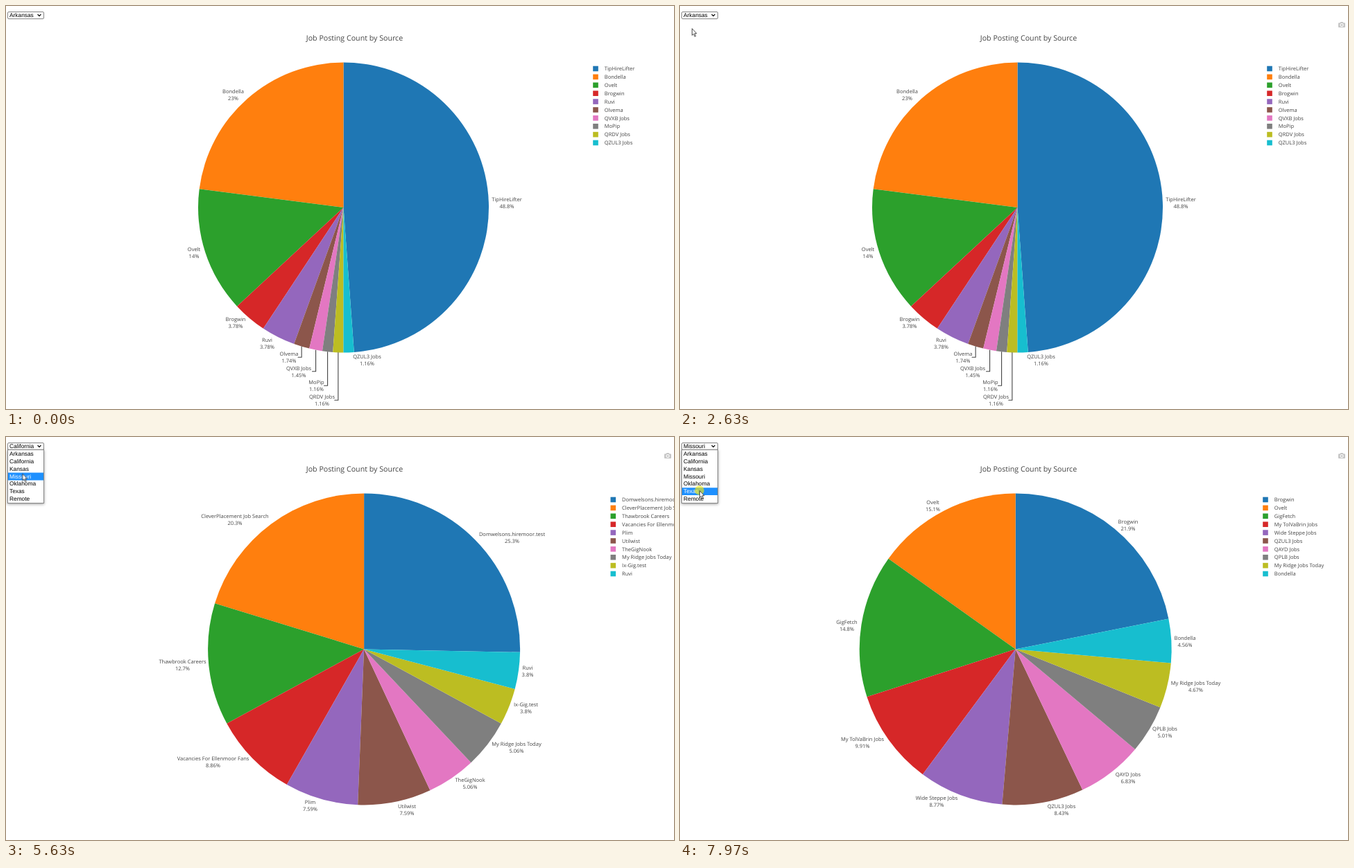
Animation of 963x582 px, one loop 8 s. Source, as an HTML page:

```html
<!DOCTYPE html>
<html lang="en">
<head>
<meta charset="utf-8">
<title>Job Posting Count by Source</title>
<style>
@property --row { syntax: "<number>"; inherits: true; initial-value: 0; }
html, body { margin: 0; width: 100%; height: 100%; overflow: hidden; background: #fff; }
#stage { position: relative; width: 963px; height: 582px; overflow: hidden; text-rendering: geometricPrecision; }
svg { position: absolute; left: 0; top: 0; }
svg text { font: 7.52px "Open Sans", sans-serif; fill: #444; }
svg .title { font-size: 10.66px; }
.mid { text-anchor: middle; }
.leader { fill: none; stroke: #444; stroke-width: 1.1; }

/* 1% of the loop is 80 ms */
.hard { animation: 8s step-end infinite; }
.a { animation-name: showA; }
.b { animation-name: showB; }
.c { animation-name: showC; }
@keyframes showA { 0% { opacity: 1; } 33.625%, 100% { opacity: 0; } }
@keyframes showB { 0% { opacity: 0; } 33.625% { opacity: 1; } 73.625%, 100% { opacity: 0; } }
@keyframes showC { 0% { opacity: 0; } 73.625%, 100% { opacity: 1; } }

.select, .frame, .list, .list ul { position: absolute; box-sizing: border-box; }
.select, .list { font: 8.36px/10.85px "Liberation Sans", Arial, sans-serif; color: #000; }
.select { left: 2px; top: 8px; width: 53px; height: 11px; border: 1px solid #858585; border-radius: 2px; }
.select span { position: absolute; left: 2px; top: -1px; }
.select svg { left: 41px; top: 1px; }
.focus { position: absolute; inset: -2px -1px -1px; border: 2px solid #101010; border-radius: 2px; animation-name: focus; }
@keyframes focus {
  0% { opacity: 0; } 33.625% { opacity: 1; } 62.875% { opacity: 0; }
  73.625% { opacity: 1; } 87.125%, 100% { opacity: 0; }
}
.frame, .list { left: 2px; top: 18px; width: 53px; height: 78px; background: #fff; }
.frame { box-shadow: 0 1px 4px rgba(0, 0, 0, .4); animation-name: frame; }
.list { border: 1px solid #858585; animation-name: list; }
@keyframes frame {
  0% { opacity: 0; } 22.625% { opacity: 1; } 32.85% { opacity: 0; } 62.875% { opacity: 1; }
  72.875% { opacity: 0; } 87.95%, 100% { opacity: 1; }
}
@keyframes list {
  0% { opacity: 0; } 23.5% { opacity: 1; } 32.85% { opacity: 0; } 63.75% { opacity: 1; }
  72.875% { opacity: 0; } 88.875%, 100% { opacity: 1; }
}
.list ul { inset: 0; margin: 0; padding: 0 0 0 2px; list-style: none; height: 75.95px; }
.list .picked {
  color: #fff; background: #1e90ff; animation-name: pick;
  clip-path: inset(calc(var(--row) * 10.85px) 0 calc((6 - var(--row)) * 10.85px) 0);
}
@keyframes pick {
  0% { --row: 0; } 26.9% { --row: 1; } 66.2% { --row: 2; } 67.3% { --row: 3; }
  90.5% { --row: 0; } 91.2% { --row: 1; } 92% { --row: 2; } 92.8% { --row: 3; }
  93.8% { --row: 4; } 95.6%, 100% { --row: 5; }
}

.camera { fill: #444; animation: camera 8s linear infinite; }
@keyframes camera {
  0%, 2.125% { opacity: 0; }
  5.5%, 17.5% { opacity: .3; }
  21%, 24.25% { opacity: .1; }
  27.7%, 37% { opacity: .3; }
  39.6%, 64.4% { opacity: .1; }
  67.8%, 84.5% { opacity: .3; }
  87.125%, 90% { opacity: .1; }
  93.7%, 100% { opacity: .3; }
}
.cursor { animation: move 8s ease-in-out infinite, enter 8s step-end infinite; }
@keyframes enter { 0% { opacity: 0; } 2.125%, 100% { opacity: 1; } }
@keyframes move {
  0%, 2.125% { transform: translate(330px, 538px); }
  11.625%, 12.375% { transform: translate(115.5px, 122px); }
  20%, 24.25% { transform: translate(28px, 15px); }
  27.7%, 37% { transform: translate(17px, 32px); }
  39.6%, 63.75% { transform: translate(27px, 12px); }
  67.8%, 84.5% { transform: translate(23.5px, 52.5px); }
  87%, 88.875% { transform: translate(27.5px, 14px); }
  93.875%, 94.75% { transform: translate(28px, 66px); }
  97.5%, 100% { transform: translate(28px, 77px); }
}
.click { fill: #ffec00; fill-opacity: .6; animation-name: click; }
@keyframes click {
  0% { opacity: 0; }
  21% { opacity: 1; } 22.625% { opacity: 0; }
  31.125% { opacity: 1; } 32.85% { opacity: 0; }
  62% { opacity: 1; } 63.75% { opacity: 0; }
  71.25% { opacity: 1; } 72.875% { opacity: 0; }
  87.125% { opacity: 1; } 88.875% { opacity: 0; }
  99.6%, 100% { opacity: 1; }
}
</style>
</head>
<body>
<div id="stage">
  <svg id="plot" width="963" height="582">
    <text class="title mid" x="502.5" y="50">Job Posting Count by Source</text>
    <path class="camera" fill-rule="evenodd" d="M950 24.3h1.6l.7-1.3h3.4l.7 1.3h1.6q1 0 1 1v4.8q0 1-1 1h-8q-1 0-1-1v-4.8q0-1 1-1z
      M954 24.9a2.6 2.6 0 1 0 .01 0zM954 25.9a1.6 1.6 0 1 1-.01 0z"/>
  </svg>
  <div class="select">
    <span class="hard a">Arkansas</span>
    <span class="hard b">California</span>
    <span class="hard c">Missouri</span>
    <svg width="8" height="6"><path d="M1.6 2L4 4.400L6.400 2" fill="none" stroke="#000" stroke-width="1.2"/></svg>
    <div class="focus hard"></div>
  </div>
  <div class="frame hard"></div>
  <div class="list hard"><ul></ul><ul class="picked hard"></ul></div>
  <svg width="963" height="582">
    <g class="cursor">
      <circle class="click hard" r="6.8"/>
      <path d="M.4.6V10.300L2.600 8.300L4.200 12.200L5.700 11.500L4.100 7.700H7Z" fill="#fff" stroke="#222" stroke-width=".8"/>
    </g>
  </svg>
</div>
<script>
const COLORS = ["#1f77b4", "#ff7f0e", "#2ca02c", "#d62728", "#9467bd",
  "#8c564b", "#e377c2", "#7f7f7f", "#bcbd22", "#17becf"];

// Slice: name, count, label centre x, label first line y, leader flag
const CHARTS = [
  { cls: "a", cx: 486.5, cy: 291, r: 209.5, legend: 850, slices: [
    ["TipHireLifter", 168, 722, 279], ["Bondella", 79, 327.5, 123],
    ["Ovelt", 48, 271, 351], ["Brogwin", 13, 331, 452.5],
    ["Ruvi", 13, 376.5, 482], ["Olvema", 6, 408, 502.5, true],
    ["QVXB Jobs", 5, 422, 523, true], ["MoPip", 4, 447.5, 543.5, true],
    ["QRDV Jobs", 4, 455.5, 564.5, true], ["QZUL3 Jobs", 4, 520.5, 506]] },
  { cls: "b", cx: 516.1, cy: 306.4, r: 225, legend: 875.3, slices: [
    ["Domwelsons.hiremoor.test", 20, 729.5, 140], ["CleverPlacement Job Search", 16, 330, 114.5],
    ["Thawbrook Careers", 10, 254.5, 324.5], ["Vacancies For Ellenmoor Fans", 7, 298.5, 464.5],
    ["Plim", 6, 438.5, 527.5], ["Utilwist", 6, 578, 533],
    ["TheGigNook", 4, 669, 495], ["My Ridge Jobs Today", 4, 736, 443.5],
    ["Ix-Gig.test", 3, 749.5, 386.5], ["Ruvi", 3, 752, 333.5]] },
  { cls: "c", cx: 483.7, cy: 306.4, r: 225, legend: 844, slices: [
    ["Brogwin", 192, 646, 122], ["Ovelt", 133, 364.5, 94],
    ["GigFetch", 130, 240.5, 267], ["My TolVaBrin Jobs", 87, 263, 436.5],
    ["Wide Steppe Jobs", 77, 370, 521], ["QZUL3 Jobs", 74, 550, 533.5],
    ["QAYD Jobs", 60, 646, 487], ["QPLB Jobs", 44, 699, 421],
    ["My Ridge Jobs Today", 41, 743.5, 355], ["Bondella", 40, 728, 290]] }
];
const STATES = ["Arkansas", "California", "Kansas", "Missouri", "Oklahoma", "Texas", "Remote"];

function add(parent, tag, attrs, text) {
  const el = document.createElementNS("http://www.w3.org/2000/svg", tag);
  for (const key in attrs) el.setAttribute(key, attrs[key]);
  if (text !== undefined) el.textContent = text;
  return parent.appendChild(el);
}

function drawChart({ cls, cx, cy, r, legend, slices }) {
  const g = add(document.getElementById("plot"), "g", { class: "hard " + cls });
  const total = slices.reduce((sum, s) => sum + s[1], 0);
  const edge = f => [cx + r * Math.sin(2 * Math.PI * f), cy - r * Math.cos(2 * Math.PI * f)];
  let turn = 0;

  slices.forEach(([name, count, x, y, leader], i) => {
    // The first slice runs clockwise from the top, the others counterclockwise
    const share = count / total;
    const from = i ? turn - share : 0;
    if (i) turn = from;
    add(g, "path", {
      fill: COLORS[i],
      d: `M${cx} ${cy}L${edge(from)}A${r} ${r} 0 ${+(share > .5)} 1 ${edge(from + share)}Z`
    });
    if (leader) add(g, "path", { class: "leader", d: `M${edge(from + share / 2)}V${y + 4.7}h-5.500` });

    add(g, "text", { class: "mid", x, y: y + 2.7 }, name);
    add(g, "text", { class: "mid", x, y: y + 12.5 }, Number((share * 100).toPrecision(3)) + "%");

    const ly = 90.5 + 11.89 * i;
    add(g, "rect", { x: legend - 3.8, y: ly - 3.8, width: 7.6, height: 7.6, fill: COLORS[i] });
    add(g, "text", { x: legend + 12.8, y: ly + 2.7 }, name);
  });
}

CHARTS.forEach(drawChart);
document.querySelectorAll(".list ul").forEach(ul => {
  ul.innerHTML = STATES.map(s => `<li>${s}</li>`).join("");
});
</script>
</body>
</html>
```
